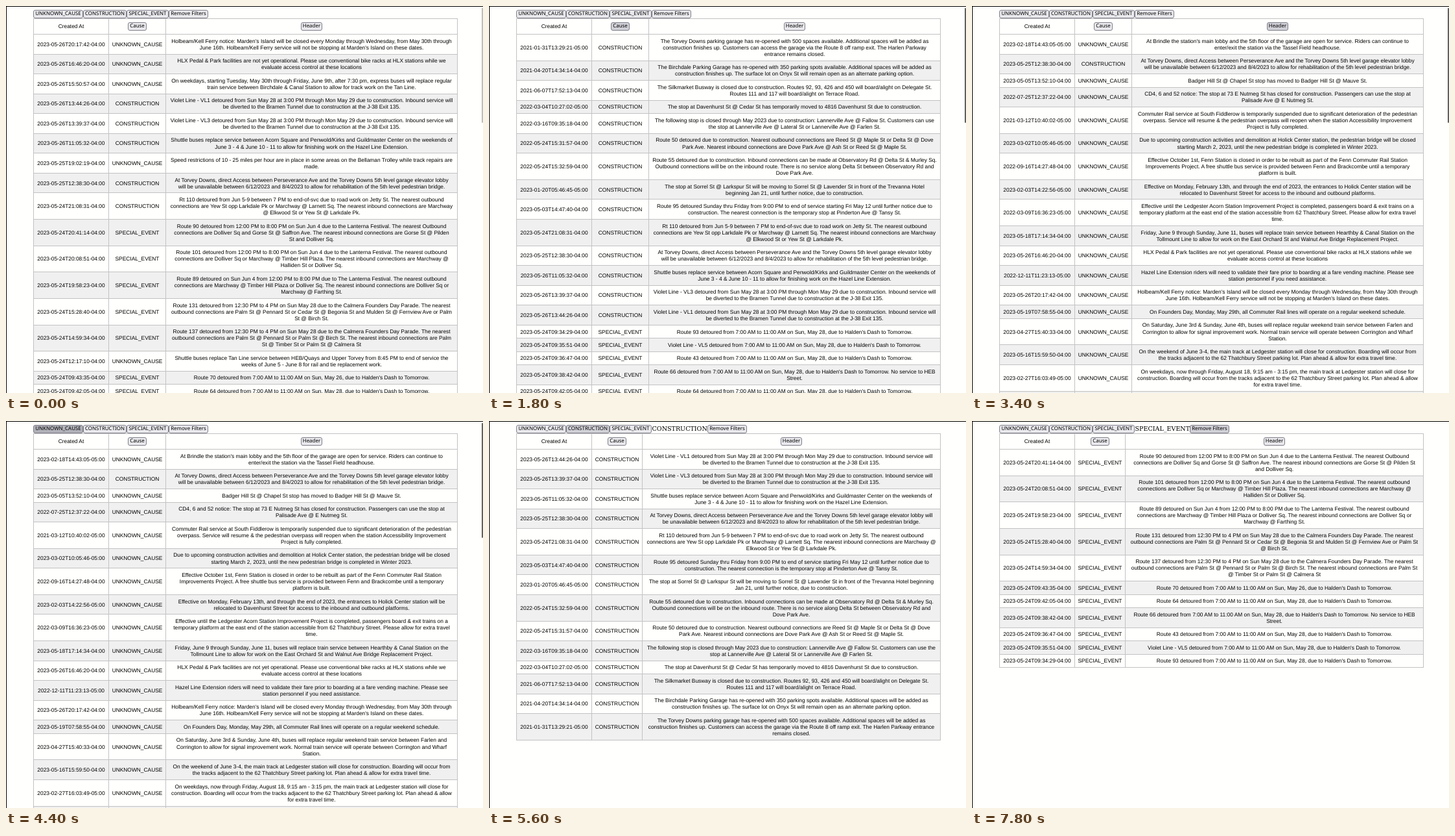
These frames come from a looping animation (736 by 596 pixels, 8000 ms). An HTML page:

```html
<!DOCTYPE html>
<html lang="en">
<head>
<meta charset="utf-8">
<title>Service alerts</title>
<style>
html, body { margin: 0; width: 100%; height: 100%; overflow: hidden; }
body { background: #fffffd; }
#stage {
  position: relative; width: 736px; height: 596px; overflow: hidden;
  box-sizing: border-box; border: solid #000; border-width: 1px 0 0 1px;
  font: 8.4px/10.08px "Liberation Sans", Arial, sans-serif;
  color: #000; text-rendering: geometricPrecision;
}
.btn {
  box-sizing: border-box; height: 13px; border: 1px solid #7f7f8a; border-radius: 3px;
  background: #e9e9ed; white-space: pre; text-align: center;
  font: 7.95px/11px "Noto Sans", "Open Sans", sans-serif;
}
.btn.hover { background: #d0d0d7; }
.btn.active { background: #b1b1b9; }
#bar .btn, #label { position: absolute; top: 5px; }
#label { left: 250.5px; font: 9.56px/13px "DejaVu Serif", serif; white-space: pre; }
.grid {
  position: absolute; left: 41px; top: 18px; width: 655px; box-sizing: border-box;
  border: solid #c2c2c2; border-width: 1px 0 0 1px;
}
.row { display: grid; grid-template-columns: 116px 88px 450px; }
.wide .row { grid-template-columns: 116px 78px 460px; }
.row:nth-child(odd):not(:first-child) { background: #f0f0f0; }
.cell {
  box-sizing: border-box; border: solid #c2c2c2; border-width: 0 1px 1px 0;
  display: flex; align-items: center; justify-content: center;
  text-align: center; white-space: pre; min-width: 0;
}
#thumb { position: absolute; left: 733px; top: 2px; width: 2px; border-radius: 1px; }
</style>
</head>
<body>
<div id="stage"><div id="bar"></div><div id="label"></div><div id="thumb"></div></div>
<script>
// Breaks in a message: | always, < in the narrow column only, > in the wide one only.
const rows = `
2023-05-26T20:17:42-04:00 U Holbeam/Kell Ferry notice: Marden’s Island will be closed every Monday through Wednesday, from May 30th through|June 16th. Holbeam/Kell Ferry service will not be stopping at Marden's Island on these dates.
2023-05-26T16:46:20-04:00 U HLX Pedal & Park facilities are not yet operational. Please use conventional bike racks at HLX stations while we|evaluate access control at these locations
2023-05-26T15:50:57-04:00 U On weekdays, starting Tuesday, May 30th through Friday, June 9th, after 7:30 pm, express buses will replace regular|train service between Birchdale & Canal Station to allow for track work on the Tan Line.
2023-05-26T13:44:26-04:00 C Violet Line - VL1 detoured from Sun May 28 at 3:00 PM through Mon May 29 due to construction. Inbound service will|be diverted to the Bramen Tunnel due to construction at the J-38 Exit 135.
2023-05-26T13:39:37-04:00 C Violet Line - VL3 detoured from Sun May 28 at 3:00 PM through Mon May 29 due to construction. Inbound service will|be diverted to the Bramen Tunnel due to construction at the J-38 Exit 135.
2023-05-26T11:05:32-04:00 C Shuttle buses replace service between Acorn Square and Penwold/Kirks and Guildmaster Center on the weekends of|June 3 - 4 & June 10 - 11 to allow for finishing work on the Hazel Line Extension.
2023-05-25T19:02:19-04:00 U Speed restrictions of 10 - 25 miles per hour are in place in some areas on the Bellaman Trolley while track repairs are|made.
2023-05-25T12:38:30-04:00 C At Torvey Downs, direct Access between Perseverance Ave and the Torvey Downs 5th level garage elevator lobby<will>be unavailable between 6/12/2023 and 8/4/2023 to allow for rehabilitation of the 5th level pedestrian bridge.
2023-05-24T21:08:31-04:00 C Rt 110 detoured from Jun 5-9 between 7 PM to end-of-svc due to road work on Jetty St. The nearest outbound|connections are Yew St opp Larkdale Pk or Marchway @ Larnett Sq. The nearest inbound connections are Marchway<@>Elkwood St or Yew St @ Larkdale Pk.
2023-05-24T20:41:14-04:00 S Route 90 detoured from 12:00 PM to 8:00 PM on Sun Jun 4 due to the Lanterna Festival. The nearest Outbound|connections are Dolliver Sq and Gorse St @ Saffron Ave. The nearest inbound connections are Gorse St @ Pilden<St>and Dolliver Sq.
2023-05-24T20:08:51-04:00 S Route 101 detoured from 12:00 PM to 8:00 PM on Sun Jun 4 due to the Lanterna Festival. The nearest outbound|connections are Dolliver Sq or Marchway @ Timber Hill Plaza. The nearest inbound connections are Marchway @|Halliden St or Dolliver Sq.
2023-05-24T19:58:23-04:00 S Route 89 detoured on Sun Jun 4 from 12:00 PM to 8:00 PM due to The Lanterna Festival. The nearest outbound|connections are Marchway @ Timber Hill Plaza or Dolliver Sq. The nearest inbound connections are Dolliver Sq or|Marchway @ Farthing St.
2023-05-24T15:28:40-04:00 S Route 131 detoured from 12:30 PM to 4 PM on Sun May 28 due to the Calmera Founders Day Parade. The nearest|outbound connections are Palm St @ Pennard St or Cedar St @ Begonia St and Mulden St @ Fernview Ave or Palm<St>@ Birch St.
2023-05-24T14:59:34-04:00 S Route 137 detoured from 12:30 PM to 4 PM on Sun May 28 due to the Calmera Founders Day Parade. The nearest|outbound connections are Palm St @ Pennard St or Palm St @ Birch St. The nearest inbound connections are Palm<St>@ Timber St or Palm St @ Calmera St
2023-05-24T12:17:10-04:00 U Shuttle buses replace Tan Line service between HEB/Quays and Upper Torvey from 8:45 PM to end of service the|weeks of June 5 - June 8 for rail and tie replacement work.
2023-05-24T09:43:35-04:00 S Route 70 detoured from 7:00 AM to 11:00 AM on Sun, May 26, due to Halden's Dash to Tomorrow.
2023-05-24T09:42:05-04:00 S Route 64 detoured from 7:00 AM to 11:00 AM on Sun, May 28, due to Halden's Dash to Tomorrow.
2023-05-24T09:40:16-04:00 U Route 86 detoured from 7:00 AM to 11:00 AM on Sun, May 28, due to Halden's Dash to Tomorrow.
2023-05-24T09:38:42-04:00 S Route 66 detoured from 7:00 AM to 11:00 AM on Sun, May 28, due to Halden's Dash to Tomorrow. No service to HEB|Street.
2023-05-24T09:36:47-04:00 S Route 43 detoured from 7:00 AM to 11:00 AM on Sun, May 28, due to Halden's Dash to Tomorrow.
2023-05-24T09:35:51-04:00 S Violet Line - VL5 detoured from 7:00 AM to 11:00 AM on Sun, May 28, due to Halden's Dash to Tomorrow.
2023-05-24T09:34:29-04:00 S Route 93 detoured from 7:00 AM to 11:00 AM on Sun, May 28, due to Halden's Dash to Tomorrow.
2023-05-24T09:28:20-04:00 U Route 66 detoured from N Mallard St from 12 PM until 11 PM on Fri 5/26, Sat 5/27, & Sun 5/28 due to the Halden|Singing music festival. Connect at Mallard Ave @ Meadow Ave
2023-05-24T09:25:34-04:00 U Route 86 detoured from N Mallard St from 12 PM until 11 PM on Fri 5/26, Sat 5/27, & Sun 5/28 due to the Halden|Singing music festival. Connect at N Mallard St @ Meadow Ave. Outbound can also connect at Feldston Gate.
2023-05-19T07:58:55-04:00 U On Founders Day, Monday, May 29th, all Commuter Rail lines will operate on a regular weekend schedule.
2023-05-18T17:14:34-04:00 U Friday, June 9 through Sunday, June 11, buses will replace train service between Hearthby & Canal Station on the|Tollmount Line to allow for work on the East Orchard St and Walnut Ave Bridge Replacement Project.
2023-05-16T15:59:50-04:00 U On the weekend of June 3-4, the main track at Ledgester station will close for construction. Boarding will occur from|the tracks adjacent to the 62 Thatchbury Street parking lot. Plan ahead & allow for extra travel time.
2023-05-05T13:52:10-04:00 U Badger Hill St @ Chapel St stop has moved to Badger Hill St @ Mauve St.
2023-05-03T14:47:40-04:00 C Route 95 detoured Sunday thru Friday from 9:00 PM to end of service starting Fri May 12 until further notice due to|construction. The nearest connection is the temporary stop at Pinderton Ave @ Tansy St.
2023-04-27T15:40:33-04:00 U On Saturday, June 3rd & Sunday, June 4th, buses will replace regular weekend train service between Farlen and|Corrington to allow for signal improvement work. Normal train service will operate between Corrington and Wharf|Station.
2023-04-24T20:29:29-04:00 U Shuttle buses replace Tan Line service between HEB/Quays and Upper Torvey from 8:45 PM to end of service May|30 - June 1 for rail and tie replacement work.
2023-04-21T08:10:07-04:00 U Route 85 is detoured for roadway and sewer work and is terminating/originating at 64 Fig St.
2023-04-18T20:01:32-04:00 U The ramp at the Overlook St entrance has been closed so a new accessible walkway to be built. To exit or enter the|station at Overlook St., please use Acorn Square Elevator 771
2023-03-11T10:03:25-05:00 U Speed restrictions of 10 - 25 miles per hour are in place in some areas on the Hazel Line. Learn more at|mbta.com/alternatives
2023-03-10T22:17:06-05:00 U Speed restrictions of 10 - 25 miles per hour are in place in some areas on the Hazel Line. Learn more at|mbta.com/alternatives
2023-03-10T22:16:43-05:00 U Speed restrictions of 10 - 25 miles per hour are in place in some areas on the Tan Line while track repairs are made.
2023-03-10T22:16:12-05:00 U Speed restrictions of 10 - 25 miles per hour are in place in some areas on the Ochre Line while track repairs are|made.
2023-03-02T10:05:46-05:00 U Due to upcoming construction activities and demolition at Holick Center station, the pedestrian bridge will be closed|starting March 2, 2023, until the new pedestrian bridge is completed in Winter 2023.
2023-02-27T16:03:49-05:00 U On weekdays, now through Friday, August 18, 9:15 am - 3:15 pm, the main track at Ledgester station will close for|construction. Boarding will occur from the tracks adjacent to the 62 Thatchbury Street parking lot. Plan ahead & allow|for extra travel time.
2023-02-18T14:43:05-05:00 U At Brindle the station's main lobby and the 5th floor of the garage are open for service. Riders can continue to|enter/exit the station via the Tassel Field headhouse.
2023-02-03T14:22:56-05:00 U Effective on Monday, February 13th, and through the end of 2023, the entrances to Holick Center station will be|relocated to Davenhurst Street for access to the inbound and outbound platforms.
2023-01-20T05:46:45-05:00 C The stop at Sorrel St @ Larkspur St will be moving to Sorrel St @ Lavender St in front of the Trevanna Hotel<beginning>Jan 21, until further notice, due to construction.
2022-12-11T11:23:13-05:00 U Hazel Line Extension riders will need to validate their fare prior to boarding at a fare vending machine. Please see|station personnel if you need assistance.
2022-09-16T14:27:48-04:00 U Effective October 1st, Fenn Station is closed in order to be rebuilt as part of the Fenn Commuter Rail Station|Improvements Project. A free shuttle bus service is provided between Fenn and Brackcombe until a temporary|platform is built.
2022-07-25T12:37:22-04:00 U CD4, 6 and 52 notice: The stop at 73 E Nutmeg St has closed for construction. Passengers can use the stop at|Palisade Ave @ E Nutmeg St.
2022-05-24T15:32:59-04:00 C Route 55 detoured due to construction. Inbound connections can be made at Observatory Rd @ Delta St & Murley Sq.|Outbound connections will be on the inbound route. There is no service along Delta St between Observatory Rd and|Dove Park Ave.
2022-05-24T15:31:57-04:00 C Route 50 detoured due to construction. Nearest outbound connections are Reed St @ Maple St or Delta St @ Dove|Park Ave. Nearest inbound connections are Dove Park Ave @ Ash St or Reed St @ Maple St.
2022-03-16T09:35:18-04:00 C The following stop is closed through May 2023 due to construction: Lannerville Ave @ Fallow St. Customers can use<the>stop at Lannerville Ave @ Lateral St or Lannerville Ave @ Farlen St.
2022-03-09T16:36:23-05:00 U Effective until the Ledgester Acorn Station Improvement Project is completed, passengers board & exit trains on a|temporary platform at the east end of the station accessible from 62 Thatchbury Street. Please allow for extra travel|time.
2022-03-04T10:27:02-05:00 C The stop at Davenhurst St @ Cedar St has temporarily moved to 4816 Davenhurst St due to construction.
2021-06-07T17:52:13-04:00 C The Silkmarket Busway is closed due to construction. Routes 92, 93, 426 and 450 will board/alight on Delegate St.|Routes 111 and 117 will board/alight on Terrace Road.
2021-04-20T14:34:14-04:00 C The Birchdale Parking Garage has re-opened with 350 parking spots available. Additional spaces will be added as|construction finishes up. The surface lot on Onyx St will remain open as an alternate parking option.
2021-03-12T10:40:02-05:00 U Commuter Rail service at South Fiddlerow is temporarily suspended due to significant deterioration of the pedestrian|overpass. Service will resume & the pedestrian overpass will reopen when the station Accessibility Improvement|Project is fully completed.
2021-01-31T13:29:21-05:00 C The Torvey Downs parking garage has re-opened with 500 spaces available. Additional spaces will be added as|construction finishes up. Customers can access the garage via the Route 8 off ramp exit. The Harlen Parkway<entrance>remains closed.
`.trim().split("\n").map(line => ({ time: line.slice(0, 25), cause: line[26], text: line.slice(28) }));

const LOOP = 8000;
const causes = { U: "UNKNOWN_CAUSE", C: "CONSTRUCTION", S: "SPECIAL_EVENT" };
const stage = document.getElementById("stage");
const bar = document.getElementById("bar");
const label = document.getElementById("label");
const thumb = document.getElementById("thumb");

const by = key => (a, b) => a[key] < b[key] ? -1 : a[key] > b[key] ? 1 : 0;
const only = cause => rows.filter(r => r.cause === cause);
const byCause = [...rows].reverse().sort(by("cause"));
byCause.sort((a, b) => by("cause")({ cause: causes[a.cause] }, { cause: causes[b.cause] }));

function add(parent, cls, text = "") {
  const el = document.createElement("div");
  el.className = cls;
  el.textContent = text;
  parent.append(el);
  return el;
}

const buttons = {};
function addButton(parent, name, width, left) {
  const el = add(parent, "btn", name);
  el.style.width = width + "px";
  if (left !== undefined) el.style.left = left + "px";
  (buttons[name] ||= []).push(el);
  return el;
}

function buildGrid(list, wide) {
  const grid = add(stage, wide ? "grid wide" : "grid");
  const head = add(grid, "row");
  head.style.height = "24px";
  add(head, "cell", "Created At");
  addButton(add(head, "cell"), "Cause", 29);
  addButton(add(head, "cell"), "Header", 33);
  for (const { time, cause, text } of list.slice(0, 20)) {
    const message = text.replace(/[|<>]/g, c => c === (wide ? "<" : ">") ? " " : "\n");
    const row = add(grid, "row");
    row.style.height = 10.4 + 10.08 * message.split("\n").length + "px";
    [time, causes[cause], message].forEach(s => add(row, "cell", s));
  }
  return grid;
}

addButton(bar, causes.U, 77, 41);
addButton(bar, causes.C, 67, 118);
addButton(bar, causes.S, 65, 185);
const remove = addButton(bar, "Remove Filters", 61, 250);

// Each view: start time, rows, filter, left edge of the last button, scroll thumb height.
const views = [
  [0, rows, "", 250, 177],
  [1800, byCause, "", 250, 177],
  [3400, [...rows].sort(by("text")), "", 250, 177],
  [4600, only("U"), "U", 349, 310],
  [5600, only("C"), "C", 336, 0],
  [6800, only("S"), "S", 335, 0]
].map(([at, list, filter, left, size]) =>
  ({ at, filter, left, size, grid: buildGrid(list, filter === "C" || filter === "S") }));

const pointer = {
  "Cause": [[1600, "hover"], [2000, ""]],
  "Header": [[2800, "hover"], [3000, "active"], [3200, "hover"], [3600, ""]],
  [causes.U]: [[4000, "hover"], [4400, "active"], [4600, "hover"], [5000, ""]],
  [causes.C]: [[5000, "hover"], [5400, "active"], [5600, "hover"], [6000, ""]],
  [causes.S]: [[6200, "hover"], [6600, "active"], [6800, "hover"], [7000, ""]],
  "Remove Filters": [[7800, "hover"]]
};

function draw() {
  const t = performance.now() % LOOP;
  const view = views.findLast(v => v.at <= t);
  for (const v of views) v.grid.style.display = v === view ? "" : "none";
  label.textContent = causes[view.filter] || "";
  remove.style.left = view.left + "px";
  thumb.style.height = view.size + "px";
  thumb.style.background = t < 1000 ? "#bdbdbd" : "#606060";
  for (const name in pointer) {
    const step = pointer[name].findLast(([at]) => at <= t);
    for (const el of buttons[name]) el.className = "btn " + (step ? step[1] : "");
  }
  requestAnimationFrame(draw);
}
draw();
</script>
</body>
</html>
```
